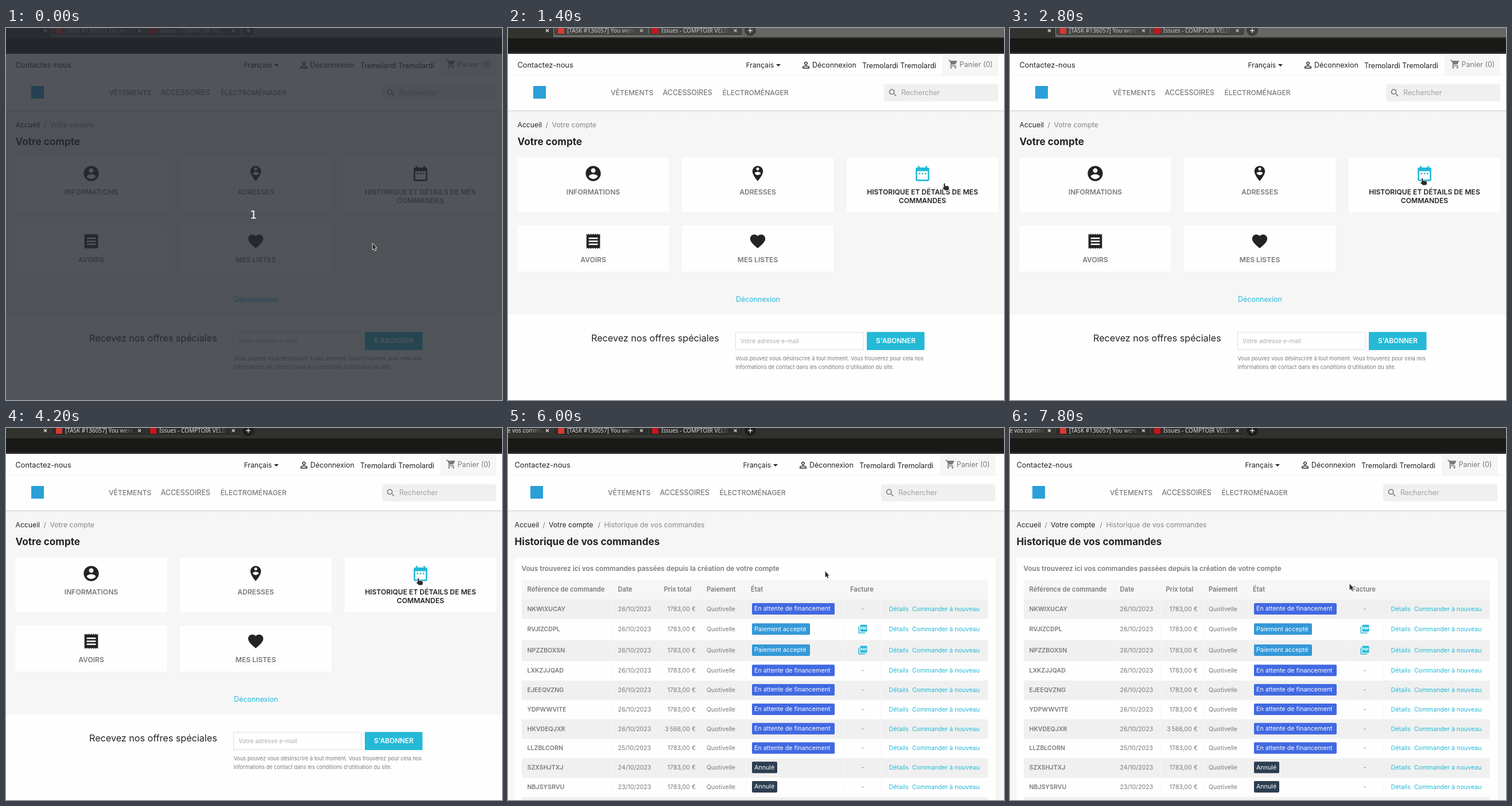
An HTML page with a canvas for the animation above (8 s loop, 864 px wide and 648 px high).

```html
<!DOCTYPE html>
<html lang="fr">
<head>
<meta charset="utf-8">
<title>Votre compte</title>
<style>
html, body { margin: 0; width: 100%; height: 100%; overflow: hidden; background: #fefefe; }
canvas { display: block; width: 864px; height: 648px; }
</style>
</head>
<body>
<canvas id="stage" width="864" height="648"></canvas>
<script>
const ctx = document.getElementById('stage').getContext('2d');
const LOOP = 8000, FOCUS_AT = 4200, ORDERS_AT = 4800;
const INK = '#232323', GREY = '#7a7a7a', CYAN = '#24b9d7', WHITE = '#fefefe', PALE = '#f6f6f6';

// 24-unit icon outlines
const icon = {
  account: 'M12 2C6.48 2 2 6.48 2 12s4.48 10 10 10 10-4.48 10-10S17.52 2 12 2zm0 3c1.66 0 3 1.34 3 3s-1.34 3-3 3-3-1.34-3-3 1.34-3 3-3zm0 14.2c-2.5 0-4.71-1.28-6-3.22.03-1.99 4-3.08 6-3.08 1.99 0 5.97 1.09 6 3.08-1.29 1.94-3.5 3.22-6 3.22z',
  pin: 'M12 2C8.14 2 5 5.14 5 9c0 5.25 7 13 7 13s7-7.75 7-13c0-3.86-3.14-7-7-7zm0 2c1.1 0 2 .9 2 2 0 1.11-.9 2-2 2s-2-.89-2-2c0-1.1.9-2 2-2zm0 10c-1.67 0-3.14-.85-4-2.15.02-1.32 2.67-2.05 4-2.05s3.98.73 4 2.05c-.86 1.3-2.33 2.15-4 2.15z',
  calendar: 'M9 11H7v2h2v-2zm4 0h-2v2h2v-2zm4 0h-2v2h2v-2zm2-7h-1V2h-2v2H8V2H6v2H5c-1.11 0-1.99.9-1.99 2L3 20c0 1.1.89 2 2 2h14c1.1 0 2-.9 2-2V6c0-1.1-.9-2-2-2zm0 16H5V9h14v11z',
  receipt: 'M18 17H6v-2h12v2zm0-4H6v-2h12v2zm0-4H6V7h12v2zM3 22l1.5-1.5L6 22l1.5-1.5L9 22l1.5-1.5L12 22l1.5-1.5L15 22l1.5-1.5L18 22l1.5-1.5L21 22V2l-1.5 1.5L18 2l-1.5 1.5L15 2l-1.5 1.5L12 2l-1.5 1.5L9 2 7.5 3.5 6 2 4.5 3.5 3 2v20z',
  heart: 'M12 21.35l-1.45-1.32C5.4 15.36 2 12.28 2 8.5 2 5.42 4.42 3 7.5 3c1.74 0 3.41.81 4.5 2.09C13.09 3.81 14.76 3 16.5 3 19.58 3 22 5.42 22 8.5c0 3.78-3.4 6.86-8.55 11.54L12 21.35z',
  person: 'M12 5.9c1.16 0 2.1.94 2.1 2.1s-.94 2.1-2.1 2.1S9.9 9.16 9.9 8s.94-2.1 2.1-2.1m0 9c2.97 0 6.1 1.46 6.1 2.1v1.1H5.9V17c0-.64 3.13-2.1 6.1-2.1M12 4C9.79 4 8 5.79 8 8s1.79 4 4 4 4-1.79 4-4-1.79-4-4-4zm0 9c-2.67 0-8 1.34-8 4v3h16v-3c0-2.66-5.33-4-8-4z',
  cart: 'M7 18c-1.1 0-1.99.9-1.99 2S5.9 22 7 22s2-.9 2-2-.9-2-2-2zM1 2v2h2l3.6 7.59-1.35 2.45c-.16.28-.25.61-.25.96 0 1.1.9 2 2 2h12v-2H7.42c-.14 0-.25-.11-.25-.25l.03-.12.9-1.63h7.45c.75 0 1.41-.41 1.75-1.03l3.58-6.49c.08-.14.12-.31.12-.48 0-.55-.45-1-1-1H5.21l-.94-2H1zm16 16c-1.1 0-1.99.9-1.99 2s.89 2 1.99 2 2-.9 2-2-.9-2-2-2z',
  search: 'M15.5 14h-.79l-.28-.27C15.41 12.59 16 11.11 16 9.5 16 5.91 13.09 3 9.5 3S3 5.91 3 9.5 5.91 16 9.5 16c1.61 0 3.09-.59 4.23-1.57l.27.28v.79l5 4.99L20.49 19l-4.99-5zm-6 0C7.01 14 5 11.99 5 9.5S7.01 5 9.5 5 14 7.01 14 9.5 11.99 14 9.5 14z',
  pdf: 'M20 2H8c-1.1 0-2 .9-2 2v12c0 1.1.9 2 2 2h12c1.1 0 2-.9 2-2V4c0-1.1-.9-2-2-2zm-8.5 7.5c0 .83-.67 1.5-1.5 1.5H9v2H7.5V7H10c.83 0 1.5.67 1.5 1.5v1zm5 2c0 .83-.67 1.5-1.5 1.5h-2.5V7H15c.83 0 1.5.67 1.5 1.5v3zm4-3H19v1h1.5V11H19v2h-1.5V7h3v1.5zM9 9.5h1v-1H9v1zM4 6H2v14c0 1.1.9 2 2 2h14v-2H4V6zm10 5.5h1v-3h-1v3z'
};
for (const name in icon) icon[name] = new Path2D(icon[name]);

const pointer = {
  arrow: new Path2D('M.6.6V11l2.3-2.1 1.8 3.7 1.6-.8-1.7-3.5H7.6z'),
  hand: new Path2D('M3.2 1.2Q4.2 0 5.2 1.2V5l5 .5Q12 6 12 7.5v2.7L11 12.5H5L1 8.7Q1.3 7.3 3.2 8.2z'),
  beam: new Path2D('M1 .5H3L4 1.5 5 .5H7M4 1.5V11.5M1 12.5H3L4 11.5 5 12.5H7')
};

// Pointer stops: time, shape, left, top
const stops = [
  [0, 'arrow', 638, 375], [1000, 'arrow', 636, 374], [1200, 'arrow', 714, 371],
  [1400, 'hand', 756, 270], [1600, 'hand', 719, 241], [1800, 'hand', 628, 266],
  [2000, 'hand', 696, 303], [2200, 'hand', 735, 291], [2400, 'hand', 727, 262],
  [2600, 'hand', 713, 265], [2800, 'hand', 714, 261], [4800, 'arrow', 719, 262],
  [6000, 'arrow', 552, 249], [6200, 'beam', 445, 234], [6400, 'beam', 276, 233],
  [6600, 'beam', 107, 234], [6800], [7000, 'arrow', 1, 351], [7200, 'arrow', 363, 426],
  [7400, 'arrow', 789, 446], [7600], [7800, 'arrow', 591, 271]
];

const waiting = ['En attente de financement', 144, '#4169e1'];
const paid = ['Paiement accepté', 101, '#3498d8'];
const cancelled = ['Annulé', 44, '#2c3e50'];
const orders = [
  ['NKWIXUCAY', 26, waiting], ['RVJIZCDPL', 26, paid], ['NPZZBOXSN', 26, paid],
  ['LXKZJJQAD', 26, waiting], ['EJEEQVZNG', 26, waiting], ['YDPWWVITE', 26, waiting],
  ['HKVDEQJXR', 26, waiting, '3\u202f566,00 €'], ['LLZBLCORN', 25, waiting],
  ['SZXSHJTXJ', 24, cancelled], ['NBJSYSRVU', 23, cancelled]
];

function rect(x, y, w, h, fill, radius = 0) {
  ctx.fillStyle = fill;
  ctx.beginPath();
  ctx.roundRect(x, y, w, h, radius);
  ctx.fill();
}

// y is the middle of the capitals
function text(str, x, y, size, fill = INK, weight = 400, align = 'left', family = 'Inter, "Open Sans"') {
  ctx.font = `${weight} ${size}px ${family}, sans-serif`;
  ctx.textAlign = align;
  ctx.fillStyle = fill;
  ctx.fillText(str, x, y + size * 0.36);
}

function drawIcon(name, cx, cy, size, fill) {
  ctx.save();
  ctx.translate(cx - size / 2, cy - size / 2);
  ctx.scale(size / 24, size / 24);
  ctx.fillStyle = fill;
  ctx.fill(icon[name]);
  ctx.restore();
}

function line(color, width, ...points) {
  ctx.strokeStyle = color;
  ctx.lineWidth = width;
  ctx.beginPath();
  points.forEach(([x, y]) => ctx.lineTo(x, y));
  ctx.stroke();
}

function cross(x, y, color) {
  line(color, 1.2, [x - 2.5, y - 2.5], [x + 2.5, y + 2.5]);
  line(color, 1.2, [x + 2.5, y - 2.5], [x - 2.5, y + 2.5]);
}

function tabTitle(str, x, end, color) {
  const fade = ctx.createLinearGradient(end - 26, 0, end, 0);
  fade.addColorStop(0, color);
  fade.addColorStop(1, color + '00');
  text(str, x, 4.4, 10, fade, 400, 'left', '"Noto Sans"');
}

function drawTabs(focused, ordersOpen) {
  const label = focused ? '#dcdcda' : '#c6c6c4';
  const edge = focused ? '#484846' : '#858583';
  rect(0, 0, 864, 45, '#191917');
  rect(0, 0, 864, 18, '#32322f');
  rect(79, 0, 785, 16, focused ? '#30302e' : '#666664');
  rect(80, 0, 328, 13, focused ? '#2c2c2a' : '#444442', [0, 0, 4, 4]);
  rect(0, 42, 864, 3, '#2d282a');
  ctx.strokeStyle = edge;
  ctx.lineWidth = 1;
  ctx.beginPath();
  ctx.moveTo(79.5, 0);
  ctx.lineTo(79.5, 9);
  ctx.quadraticCurveTo(79.5, 13.5, 84, 13.5);
  ctx.lineTo(408, 13.5);
  ctx.stroke();
  line(edge, 1, [244.5, 0], [244.5, 10]);
  if (ordersOpen) tabTitle('e vos comma', -1, 62, '#dcdcda');
  rect(87, 0, 11, 10, '#d63a30');
  rect(251, 0, 11, 10, '#c8141c');
  tabTitle('[TASK #136057] You were', 103, 224, label);
  tabTitle('Issues - COMPTOIR VELD', 267, 388, label);
  cross(68.5, 4.5, '#eeeeec');
  cross(232.5, 4.5, label);
  cross(396, 4.5, label);
  ctx.fillStyle = focused ? '#1d1d1b' : '#3d3d3b';
  ctx.beginPath();
  ctx.arc(422, 4, 10, 0, 7);
  ctx.fill();
  line('#e4e4e2', 1.4, [418, 4.5], [426, 4.5]);
  line('#e4e4e2', 1.4, [422, 0.5], [422, 8.5]);
}

function drawHeader(shift) {
  rect(0, 45, 864, 98, WHITE);
  rect(0, 82, 864, 1, '#f1f1f1');
  const shade = ctx.createLinearGradient(0, 143, 0, 147);
  shade.addColorStop(0, 'rgba(0,0,0,.1)');
  shade.addColorStop(1, 'rgba(0,0,0,0)');
  rect(0, 143, 864, 4, shade);
  ctx.save();
  ctx.translate(shift, 0);
  text('Contactez-nous', 16.5, 64, 12.8);
  text('Français', 414.5, 65, 12.2);
  ctx.fillStyle = INK;
  ctx.fill(new Path2D('M467 63h8l-4 4z'));
  drawIcon('person', 519, 64.5, 18, INK);
  text('Déconnexion', 530, 65, 12.4);
  text('Tremolardi Tremolardi', 617, 65, 12.5);
  rect(757, 46, 97, 36, PALE);
  drawIcon('cart', 775.5, 63, 18, GREY);
  text('Panier (0)', 786.5, 63.5, 12.5, GREY);
  rect(44, 101, 22, 22, '#2a9fd8');
  text('VÊTEMENTS', 179, 113, 12.1, GREY, 500);
  text('ACCESSOIRES', 269.5, 113, 12.4, GREY, 500);
  text('ÉLECTROMÉNAGER', 373.5, 113, 12.1, GREY, 500);
  rect(655, 98, 199, 30, '#f0f0f0', 4);
  drawIcon('search', 670.5, 113, 18, GREY);
  text('Rechercher', 685, 113, 12.4, '#a2a2a2');
  text('Accueil', 16.5, 169, 12.2);
  text('/', 65.5, 169, 12.1, GREY);
  ctx.restore();
}

function card(x, y, h, name, lines, hover) {
  rect(x, y, 264, h, WHITE);
  drawIcon(name, x + 132, y + 27.5, 31.6, hover ? CYAN : INK);
  lines.forEach((str, i) =>
    text(str, x + 132, y + 60 + i * 15, 12.1, hover ? INK : GREY, 600, 'center'));
}

function drawAccount(hover) {
  text('Votre compte', 76.5, 169, 12.2, '#858585');
  text('Votre compte', 16.5, 198, 17.1, INK, 700);
  card(16.5, 226, 95, 'account', ['INFORMATIONS']);
  card(303, 226, 95, 'pin', ['ADRESSES']);
  card(590, 226, 95, 'calendar', ['HISTORIQUE ET DÉTAILS DE MES', 'COMMANDES'], hover);
  card(16.5, 344, 80, 'receipt', ['AVOIRS']);
  card(303, 344, 80, 'heart', ['MES LISTES']);
  text('Déconnexion', 435.5, 473, 12.4, CYAN, 400, 'center');
  rect(0, 499, 864, 149, WHITE);
  text('Recevez nos offres spéciales', 145, 540, 16.15);
  rect(396, 529.5, 223.5, 31.5, '#dedede');
  rect(397, 530.5, 221.5, 29.5, WHITE);
  text('Votre adresse e-mail', 405, 545, 10.4, '#adadad');
  rect(625, 529.5, 100.5, 31.5, CYAN);
  text("S'ABONNER", 675.5, 545, 11.8, WHITE, 600, 'center');
  text('Vous pouvez vous désinscrire à tout moment. Vous trouverez pour cela nos', 396.5, 576, 9.2, GREY);
  text("informations de contact dans les conditions d'utilisation du site.", 396.5, 591, 9.2, GREY);
}

function orderRow([ref, day, [state, width, color], price = '1783,00 €'], y, h) {
  const mid = y + h / 2 - 0.8;
  const size = 10.6;
  text(ref, 33.5, mid, size, GREY, 600);
  text(`${day}/10/2023`, 191.5, mid, size, GREY);
  text(price, 327, mid, size, GREY, 400, 'right');
  text('Quotivelle', 346, mid, size, GREY);
  rect(425, mid - 10, width, 20, color, 2);
  text(state, 429, mid - 0.5, 10.7, WHITE);
  if (state === paid[0]) drawIcon('pdf', 618, mid, 18, CYAN);
  else text('-', 618, mid, size, GREY, 400, 'center');
  text('Détails', 663.5, mid, 10.7, CYAN);
  text('Commander à nouveau', 704, mid, 10.7, CYAN);
}

function drawOrders() {
  text('Votre compte', 71, 169, 12.2);
  text('/', 156.5, 169, 12.1, GREY);
  text('Historique de vos commandes', 167.5, 169, 12.2, '#858585');
  text('Historique de vos commandes', 11.5, 198, 17.1, INK, 700);
  rect(11.5, 226, 837.5, 422, WHITE);
  text('Vous trouverez ici vos commandes passées depuis la création de votre compte', 23.5, 244.5, 11.8, GREY, 600);
  rect(24, 264, 812, 35, PALE);
  const heads = { 'Référence de commande': 33.5, 'Date': 191.5, 'Prix total': 271.5, 'Paiement': 346, 'État': 423, 'Facture': 596 };
  for (const name in heads) text(name, heads[name], 281, 11.2, GREY, 600);
  let y = 299;
  orders.forEach((order, i) => {
    const h = order[2] === paid ? 36.7 : 33.8;
    if (i % 2 === 0) rect(24, y, 812, h, '#f0f0f0');
    for (const x of [182, 262, 337, 414, 586, 649]) rect(x, y, 1, h, PALE);
    orderRow(order, y, h);
    y += h;
  });
  rect(24, y, 812, 648 - y, '#f0f0f0');
}

function drawPointer(t) {
  const [, shape, x, y] = stops.findLast(stop => stop[0] <= t);
  if (!shape) return;
  ctx.save();
  ctx.translate(x, y);
  ctx.lineJoin = 'round';
  ctx.strokeStyle = shape === 'beam' ? '#2a2a2a' : '#f4f4f4';
  ctx.lineWidth = shape === 'beam' ? 1 : 1.6;
  ctx.stroke(pointer[shape]);
  if (shape !== 'beam') {
    ctx.fillStyle = '#2b2b2b';
    ctx.fill(pointer[shape]);
  }
  ctx.restore();
}

function draw() {
  const t = performance.now() % LOOP;
  const ordersOpen = t >= ORDERS_AT;
  rect(0, 0, 864, 648, PALE);
  drawTabs(t >= FOCUS_AT, ordersOpen);
  drawHeader(ordersOpen ? -5 : 0);
  if (ordersOpen) drawOrders();
  else drawAccount(t >= 1400);
  if (t < 200) {
    rect(0, 0, 864, 648, 'rgba(38,42,48,.8)');
    text('1', 431, 325, 20, '#fff', 400, 'center', '"DejaVu Sans"');
  }
  drawPointer(t);
  requestAnimationFrame(draw);
}
draw();
</script>
</body>
</html>
```
